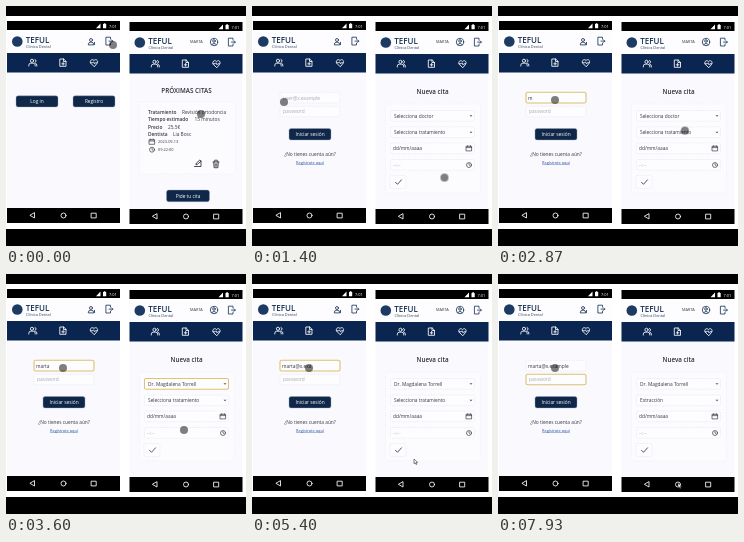
An HTML page that plays this animation: 240 by 240 pixels, repeating every 8 s.

```html
<!DOCTYPE html>
<html lang="es">
<head>
<meta charset="utf-8">
<title>Clínica dental</title>
<style>
html, body { margin: 0; width: 100%; height: 100%; overflow: hidden; background: #000; }
svg { display: block; width: 100vw; height: 100vh; }
text { font: 4.8px "Open Sans", "Noto Sans", sans-serif; fill: #363840; white-space: pre; }
.brand { font-size: 8px; font-weight: 600; fill: #1b3353; }
.sub { font-size: 3.9px; fill: #33455f; }
.small { font-size: 3.9px; }
.title { font-size: 6.3px; font-weight: 600; fill: #2c2e36; }
.bold { font-weight: 600; }
.mid { text-anchor: middle; }
.light { fill: #fff; }
.hint { fill: #a7a9b2; }
.link { font-size: 4px; fill: #2b55a0; text-decoration: underline; }
.line { fill: none; stroke: #22395c; stroke-width: .85; stroke-linecap: round; stroke-linejoin: round; }
.white { stroke: #fff; }
.dark { stroke: #2d2f35; }
.thin { stroke-width: .65; }
.field { fill: #fdfdff; stroke: #e3e4ec; stroke-width: .6; stroke-dasharray: 1.5 .8; }
.card { fill: #fcfcff; stroke: #e9eaf1; stroke-width: .6; stroke-dasharray: 1.5 1.5; }
.focus { fill: none; stroke: #dfc573; stroke-width: 1.1; }
.btn { fill: #0f2749; stroke: #9aa8bc; stroke-width: .4; }
.dot { fill: #000; fill-opacity: .5; }
.arrow { fill: #fff; stroke: #333; stroke-width: .6; }
.pointer { animation: 8s ease-in-out infinite; }
#leftPointer { animation-name: left; }
#rightPointer { animation-name: right; }
#rightPage { animation: scroll 8s infinite; }
@keyframes scroll {
  0%, 2% { transform: none; }
  6%, 13.74% { transform: translateY(-3px); }
  13.75%, 100% { transform: none; }
}
@keyframes left {
  0%, 10.5% { transform: translate(107px, 39px); }
  15.5%, 19% { transform: translate(32px, 96px); }
  23%, 100% { transform: translate(57px, 94px); }
}
@keyframes right {
  0%, 1% { transform: translate(195px, 108px); }
  6.5%, 15% { transform: translate(190px, 187px); }
  23%, 33% { transform: translate(202px, 112px); }
  37% { transform: translate(184px, 127px); }
  44%, 52% { transform: translate(178px, 156px); }
  60%, 69% { transform: translate(162px, 185px); }
  74%, 77% { transform: translate(190px, 127px); }
  83%, 86% { transform: translate(197.5px, 156px); }
  90% { transform: translate(148px, 177px); }
  98%, 100% { transform: translate(180px, 209px); }
}
</style>
</head>
<body>
<svg viewBox="0 0 240 240" preserveAspectRatio="none">
  <defs>
    <g id="screen">
      <rect y="4" width="113" height="198" fill="#fafafe"/>
      <rect y="9" width="113" height="23" fill="#fdfdff"/>
      <circle cx="10.3" cy="20.5" r="5.3" fill="#1d3a63"/>
      <text class="brand" x="18.7" y="22">TEFUL</text>
      <text class="sub" x="19" y="26.8">Clínica Dental</text>
      <path class="line" d="M103.5 18V16.2h-4.6v7.8h4.6v-1.8 M102 20.1h3.8m-1.3-1.3 1.3 1.3-1.3 1.3"/>
      <rect y="32" width="113" height="19.5" fill="#0a2650"/>
      <g class="line white">
        <circle cx="25" cy="39.8" r="1.6"/>
        <path d="M21.8 45v-.8q0-2 2-2h2.4q2 0 2 2v.8 M28 38.4a1.6 1.6 0 0 1 0 3 M29.8 45v-1q0-1.3-1.2-1.7"/>
        <path d="M53.2 38h3.5l2.3 2.3v5h-5.8z M56.5 38v2.5H59 M56.1 41.5v2.6m-1.3-1.3h2.6"/>
        <path d="M87 45.5l-3-3c-2-2 .6-5.4 3-3 2.4-2.4 5 1 3 3z M83.5 41.8h2l1-1 1 2 .8-1h1.8"/>
      </g>
    </g>
    <g id="bars">
      <rect width="113" height="9" fill="#000"/>
      <path d="M89 7.2h4.5V2.5z M96 3h.8v-.7h1.6V3h.8v4.2H96z" fill="#fff"/>
      <text class="small light" x="102" y="6.6">7:01</text>
      <rect y="187" width="113" height="15" fill="#000"/>
      <path class="line white" d="M27.5 192v5l-4.3-2.5z M84.5 192.2h4.7v4.7h-4.7z"/>
      <circle class="line white" cx="56.5" cy="194.5" r="2.5"/>
    </g>
    <path id="calendar" class="line dark thin" d="M-2.6-2h5.2v4.6h-5.2z M-2.6-.7h5.2 M-1.3-2.7v1 M1.3-2.7v1"/>
    <g id="clock" class="line dark thin">
      <circle r="2.5"/><path d="M0-1.4V0l1 .6"/>
    </g>
    <path id="caret" d="M-1.5-.8h3L0 .8z" fill="#55575e"/>
  </defs>

  <rect y="10" width="240" height="213" fill="#fff"/>

  <g id="leftPage">
    <use href="#screen" x="1" y="15"/>
    <g class="line">
      <circle cx="85" cy="34" r="1.5"/>
      <path d="M82.2 38.5q0-2.4 2.8-2.4t2.8 2.4z M88.5 36.3v2.4"/>
    </g>
    <g data-on="0 1400">
      <rect class="btn" x="10" y="89.8" width="42" height="11.2" rx="2"/>
      <text class="mid light" x="31" y="97.2">Log in</text>
      <rect class="btn" x="67" y="89.8" width="42" height="11.2" rx="2"/>
      <text class="mid light" x="88" y="97.2">Registro</text>
    </g>
    <g data-on="1400 8000">
      <rect class="field" x="28" y="86.3" width="60" height="10.7" rx="1.5"/>
      <rect class="field" x="28" y="100.3" width="60" height="10.5" rx="1.5"/>
      <rect class="focus" data-on="2050 7500" x="28" y="86.3" width="60" height="10.7" rx="1.5"/>
      <rect class="focus" data-on="7500 8000" x="28" y="100.3" width="60" height="10.5" rx="1.5"/>
      <text class="hint" data-on="1400 2600" x="31" y="93.5">user@x.example</text>
      <text id="typed" x="30" y="93.7"></text>
      <text class="hint" x="31" y="107.2">password</text>
      <rect class="btn" x="37" y="122.5" width="42" height="11.5" rx="2"/>
      <text class="mid light" x="58" y="130">Iniciar sesión</text>
      <text class="mid" x="58" y="149.8">¿No tienes cuenta aún?</text>
      <text class="mid link" x="58" y="157.5">Regístrate aquí</text>
    </g>
  </g>
  <use href="#bars" x="1" y="15"/>

  <g id="rightPage">
    <use href="#screen" x="123.5" y="16"/>
    <g class="line">
      <circle cx="208" cy="36" r="3.7"/>
      <circle cx="208" cy="35" r="1.3"/>
      <path d="M205.7 38.5q2.3-2.6 4.6 0"/>
    </g>
    <text class="small" x="184" y="37.3">MARTA</text>
    <g data-on="0 1100">
      <text class="mid title" x="180.5" y="87.4">PRÓXIMAS CITAS</text>
      <rect class="card" x="133.5" y="96" width="96" height="72" rx="2"/>
      <text class="bold" x="142" y="107.5">Tratamiento</text>
      <text x="176" y="107.5">Revisión ortodoncia</text>
      <text class="bold" x="142" y="115">Tiempo estimado</text>
      <text x="188.5" y="115">15 minutos</text>
      <text class="bold" x="142" y="122.7">Precio</text>
      <text x="162" y="122.7">25,5€</text>
      <text class="bold" x="142" y="130.3">Dentista</text>
      <text x="167" y="130.3">Lia Bosc</text>
      <use href="#calendar" x="146" y="135.7"/>
      <text class="small" x="152" y="137">2023-09-13</text>
      <use href="#clock" x="146" y="143.7"/>
      <text class="small" x="152" y="145">09:22:00</text>
      <path class="line dark" d="M188.5 160.5h6.5v-5.5 M190 158.5l.4-1.5 3.5-3 1.2 1.2-3.6 3z M207 156h6 M208.7 155.7v-1.5h2.6v1.5 M207.7 156l.4 5.7h3.8l.4-5.7 M209.2 157.7v2.6 M210.8 157.7v2.6"/>
      <rect class="btn" x="160.5" y="184" width="43" height="11.7" rx="2.2"/>
      <text class="mid light" x="182" y="191.6">Pide tu cita</text>
    </g>
    <g data-on="1100 8000">
      <text class="mid title" x="180.5" y="87.7">Nueva cita</text>
      <rect class="card" x="133.5" y="98" width="95" height="89" rx="2"/>
      <rect class="field" x="138.5" y="104.5" width="84" height="10.7" rx="1.5"/>
      <rect class="field" x="138.5" y="121" width="84" height="10.7" rx="1.5"/>
      <rect class="field" x="138.5" y="137" width="84" height="10.7" rx="1.5"/>
      <rect class="field" x="138.5" y="153.5" width="84" height="10.7" rx="1.5"/>
      <rect class="focus" data-on="3000 4300" x="138.5" y="104.5" width="84" height="10.7" rx="1.5"/>
      <text data-on="1100 3000" x="142" y="111.6">Selecciona doctor</text>
      <text data-on="3000 8000" x="142" y="111.6">Dr. Magdalena Torrell</text>
      <text data-on="1100 6150" x="142" y="128.1">Selecciona tratamiento</text>
      <text data-on="6150 8000" x="142" y="128.1">Extracción</text>
      <text x="141" y="144.2">dd/mm/aaaa</text>
      <text class="hint" x="141" y="160.6">--:--</text>
      <use href="#caret" x="219" y="110"/>
      <use href="#caret" x="219" y="126.5"/>
      <use href="#calendar" x="217" y="142.3"/>
      <use href="#clock" x="217" y="159"/>
      <rect class="field" x="138" y="169.5" width="16" height="13" rx="1.5"/>
      <path id="check" class="line" d="M143.5 176.3l2 2 4-4.5"/>
    </g>
  </g>
  <use href="#bars" x="123.5" y="16"/>

  <g class="pointer" id="leftPointer"><circle class="dot" r="4"/></g>
  <g class="pointer" id="rightPointer">
    <circle class="dot" data-on="0 4700 5800 7650" r="4"/>
    <path class="arrow" data-on="4700 5800 7650 8000" d="M0 0v4.7l1.1-1 .9 1.8.9-.4-.8-1.7h1.6z"/>
  </g>
</svg>
<script>
const LOOP = 8000;
const email = "marta@x.example";
// [time, letters typed so far]
const typing = [[2600, 0], [3400, 5], [4500, 5], [5350, 11], [6200, 11], [6700, 13], [7200, 15], [LOOP, 15]];
const typed = document.getElementById("typed");
const check = document.getElementById("check");
const timed = [...document.querySelectorAll("[data-on]")].map(el => ({ el, times: el.dataset.on.split(" ").map(Number) }));

function typedLength(t) {
  const i = typing.findIndex(([time]) => t < time);
  if (i < 1) return 0;
  const [t0, n0] = typing[i - 1], [t1, n1] = typing[i];
  return Math.floor(n0 + (n1 - n0) * (t - t0) / (t1 - t0));
}

function draw() {
  const t = performance.now() % LOOP;
  for (const { el, times } of timed) {
    const passed = times.filter(time => time <= t).length;
    el.style.display = passed % 2 ? "" : "none";
  }
  typed.textContent = email.slice(0, typedLength(t));
  check.style.stroke = t > 6150 && t < 7200 ? "#8c3d40" : t > 3000 && t < 4300 ? "#44464a" : "";
  requestAnimationFrame(draw);
}
draw();
</script>
</body>
</html>
```
